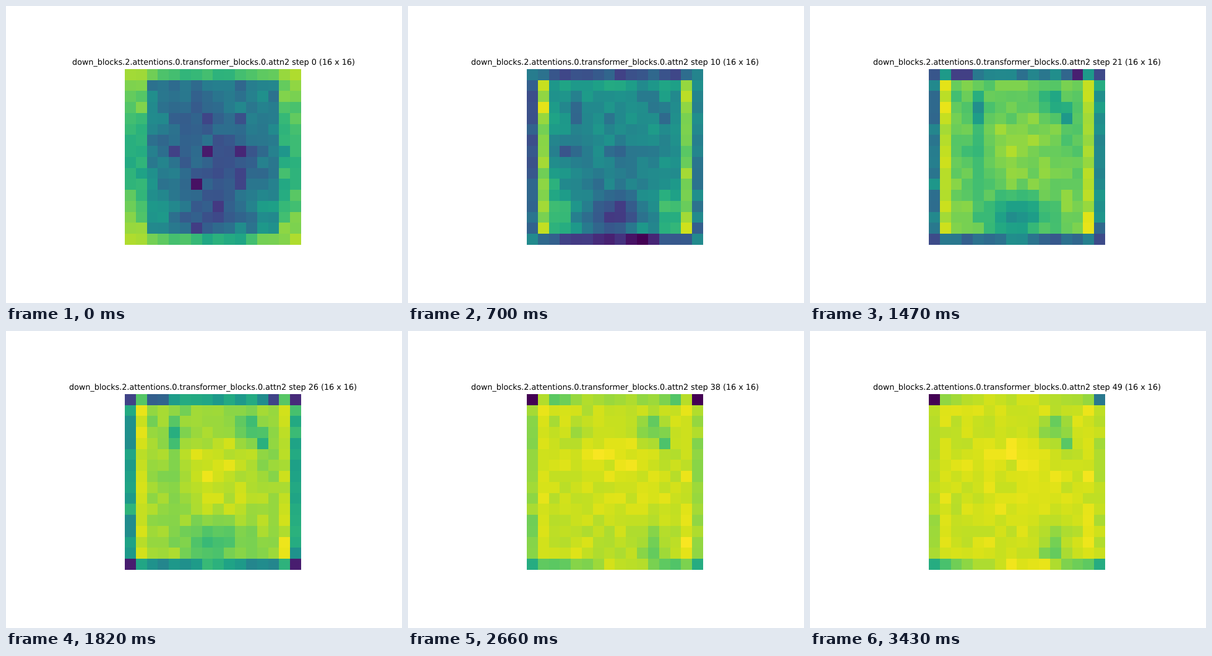
These frames come from a looping animation (640x480 px, 3500 ms). A matplotlib script:

```python
import numpy as np
import matplotlib.pyplot as plt
from matplotlib.animation import FuncAnimation

plt.rcParams["font.family"] = "DejaVu Sans"
plt.rcParams["text.hinting"] = "no_hinting"

W, H, DPI = 640, 480, 100
LEFT, TOP, RIGHT, BOTTOM = 192, 102, 477, 386
N, STEPS, INTERVAL = 16, 50, 70
LABEL = "down_blocks.2.attentions.0.transformer_blocks.0.attn2 step {} (16 x 16)"

rows, cols = np.mgrid[0:N, 0:N]
edge = np.linspace(-1, 1, N) ** 2  # 0 mid-side, 1 at the corners
rng = np.random.default_rng(7)
grain_a, grain_b = rng.normal(0, 1, (2, N, N))
on_border = (rows % (N - 1) == 0) | (cols % (N - 1) == 0)

EYES = [(7, 4), (7, 7), (7, 10)]
SHADOWS = [(4, 10), (9.5, 10), (10, 6), (14, 6)]


def rise(step, center, width):
    return 1 / (1 + np.exp((center - step) / width))


def bump(step, center, width):
    return np.exp(-((step - center) / width) ** 2 / 2)


def blob(r, c, height, width):
    return bump(rows, r, height) * bump(cols, c, width)


def border(step, low, gain, bow=0):
    """One outer side: bright at first, then dark, then slowly bright again."""
    fade = np.exp(-step / 4)
    late = low + gain * rise(step, 27, 5)
    late = late + bow * (1 - 2 * edge) * np.tanh((step - 16) / 5)
    return fade * (0.66 + 0.25 * edge) + (1 - fade) * late


def face(step, growth):
    """The portrait inside the frame; its parts fade in and out."""
    fade = np.exp(-step / 5)
    m = np.full((N, N), 0.44 + 0.48 * growth)
    m += np.interp(step, [0, 10, 17, 26, 38], [-.2, -.08, .09, .1, .03]) * blob(8, 8, 3, 2.6)
    m -= 0.12 * fade * blob(3, 6, 1.5, 1.5)
    m -= 0.36 * bump(step, 13, 11) * blob(12.7, 7.6, 1.2, 1.6)
    m += 0.05 * growth * blob(5, 7.5, 0.7, 2)
    m += 0.13 * bump(step, 14, 6) * blob(1, 5, 0.4, 6)
    for c in (2.3, 12.7):
        m += 0.2 * bump(step, 11, 8) * blob(13, c, 1.8, 1)
    hair = 0.18 * min(1, step / 15)
    m -= hair * (blob(2.4, 10.8, 0.8, 0.7) + blob(4, 12, 0.6, 0.4))
    m -= 0.22 * bump(step, 20, 11) * blob(3, 4, 1, 0.4)
    m -= 0.2 * rise(step, 33, 3) * blob(13.7, 10.8, 1.2, 0.6)
    m -= 0.1 * bump(step, 18, 7) * blob(8, 4, 3, 0.4)
    m -= 0.18 * bump(step, 9, 4) * (blob(7.2, 3, 0.5, 0.8) + blob(7, 7.5, 0.5, 0.6))
    for r, c in EYES + SHADOWS:
        m -= 0.2 * fade * blob(r, c, 0.4, 0.3)
    return m


def attention(step):
    growth = rise(step, 18.5, 5)
    m = face(step, growth)

    fade = np.exp(-step / 4)
    frame = 0.81 + 0.13 * growth + 0.11 * edge * (1 - growth)
    m[:, 1] = m[:, -2] = fade * (0.62 + 0.28 * edge) + (1 - fade) * frame
    m[:, 0] = border(step, 0.24, 0.64)
    m[:, -1] = border(step, 0.42, 0.48)
    m[0] = border(step, 0.25, 0.62, bow=0.06)
    m[-1] = border(step, 0.2, 0.6, bow=0.14)
    m[[0, 0, -1, -1], [1, -2, 1, -2]] += 0.25 * bump(step, 28, 8)
    m -= 0.32 * bump(step, 25, 8) * (blob(0, 2.5, 0.3, 0.6) + blob(0, 13, 0.3, 0.3))

    phase = np.pi * step / STEPS
    grain = grain_a * np.cos(phase) + grain_b * np.sin(phase)
    m += grain * np.where(on_border, 0.02 + 0.05 * bump(step, 16, 9), 0.045 - 0.025 * growth)

    m[0, 0] = np.interp(step, [0, 10, 26, 31], [.86, .42, .2, 0])
    m[0, -1] = np.interp(step, [0, 10, 31, 38, 49], [.88, .45, .02, 0, .4])
    m[-1, [0, -1]] = np.interp(step, [0, 10, 17, 26, 31, 38], [.88, .48, .35, .08, .07, .62])
    return np.clip(m, 0, 1)


fig = plt.figure(figsize=(W / DPI, H / DPI), dpi=DPI, facecolor="white")
ax = fig.add_axes([LEFT / W, 1 - BOTTOM / H, (RIGHT - LEFT) / W, (BOTTOM - TOP) / H])
ax.set_axis_off()
image = ax.imshow(attention(0), cmap="viridis", vmin=0, vmax=1,
                  interpolation="nearest", aspect="auto")
title = fig.text(335 / W, 1 - 95 / H, LABEL.format(0), fontsize=9.2,
                 ha="center", va="baseline")


def update(step):
    image.set_data(attention(step))
    title.set_text(LABEL.format(step))
    return image, title


anim = FuncAnimation(fig, update, frames=STEPS, interval=INTERVAL,
                     repeat=True, repeat_delay=0, blit=False)
plt.show()
```
